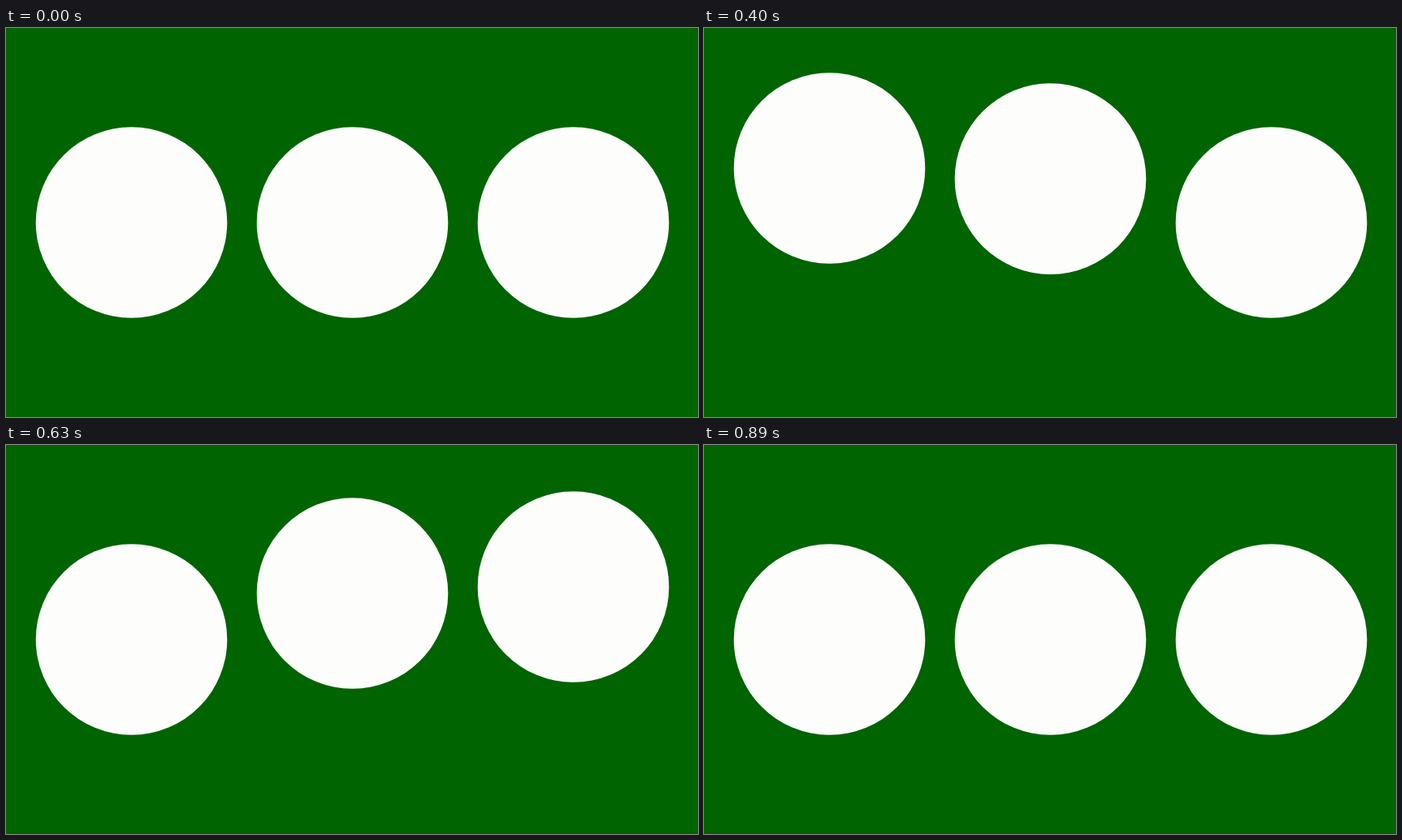
Write an HTML page that moves like this. It is 852x480 px and loops after 1.02 s.

```html
<!DOCTYPE html>
<html lang="en">
<head>
<meta charset="utf-8">
<title>Bouncing dots</title>
<style>
  html, body { margin: 0; width: 100%; height: 100%; overflow: hidden; background: #006400; }
  svg { display: block; width: 100%; height: 100%; }
  circle { fill: #fdfdfc; }
</style>
</head>
<body>
<svg viewBox="0 0 852 480">
  <circle cx="154.5" cy="240" r="117.8"/>
  <circle cx="426.5" cy="240" r="117.8"/>
  <circle cx="698.5" cy="240" r="117.8"/>
</svg>
<script>
  const LOOP = 1020;
  const TICK = 33;      // ms per drawn step
  const HEIGHT = 68;
  const MOVE = 167.5;   // ms for one rise or fall

  // Start of each dot's rise and fall, in ms.
  const dots = [
    { rise: 180, fall: 383 },
    { rise: 279, fall: 583 },
    { rise: 482, fall: 682 },
  ];
  const circles = document.querySelectorAll('circle');

  function progress(time, start) {
    const s = Math.min(1, Math.max(0, (time - start) / MOVE));
    return (1 - Math.cos(Math.PI * s)) / 2;
  }

  function draw(elapsed) {
    const time = Math.floor((elapsed % LOOP + 4.9) / TICK) * TICK;
    dots.forEach(({ rise, fall }, i) => {
      const lift = HEIGHT * (progress(time, rise) - progress(time, fall));
      circles[i].setAttribute('cy', (240 - lift).toFixed(2));
    });
  }

  const start = performance.now();
  function loop() {
    draw(performance.now() - start);
    requestAnimationFrame(loop);
  }
  loop();
</script>
</body>
</html>
```
